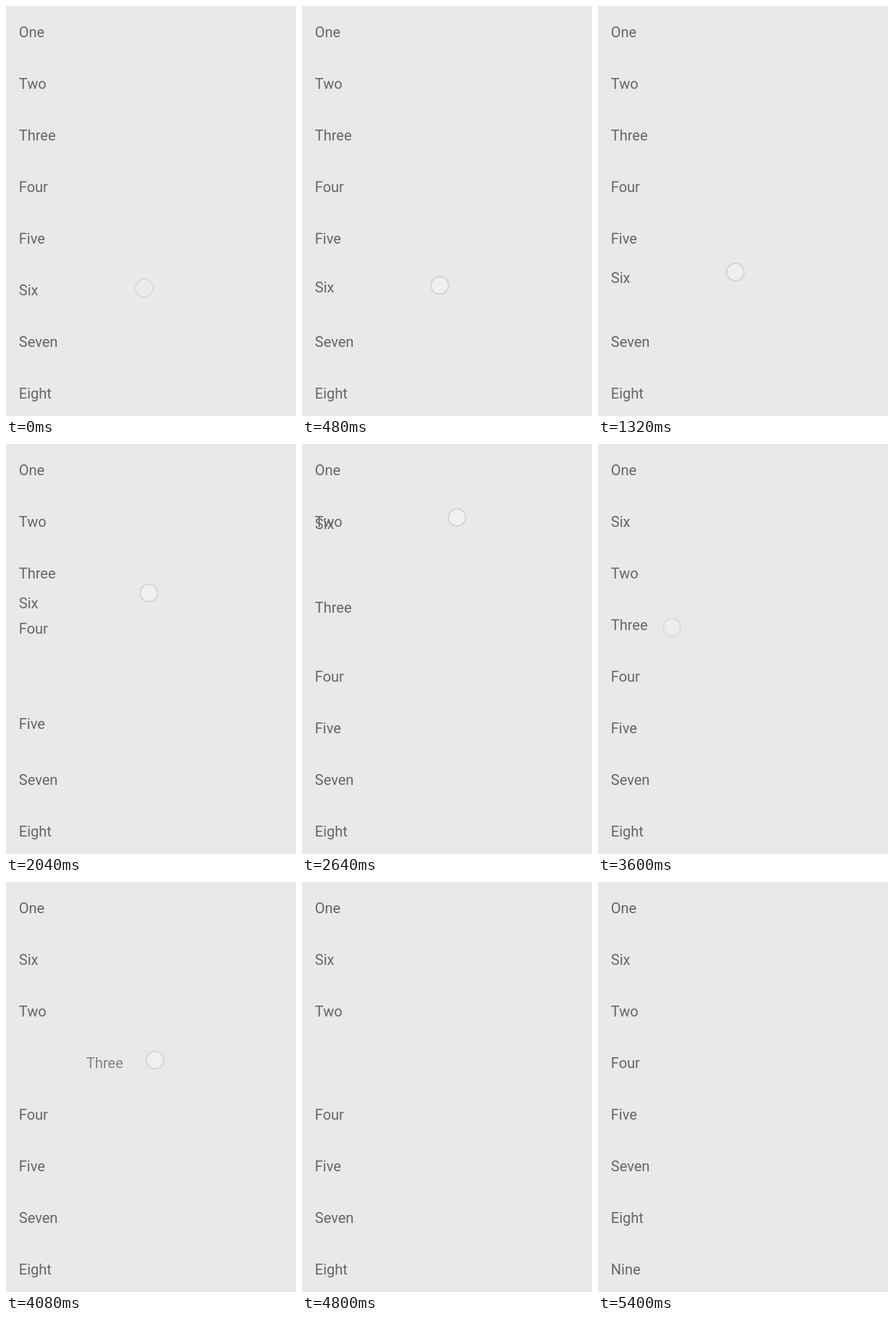
These frames come from a looping animation (400 px wide and 564 px high, 6120 ms). An HTML page:

```html
<!DOCTYPE html>
<html lang="en">
<head>
<meta charset="utf-8">
<title>Reorder and swipe list</title>
<style>
  html, body { margin: 0; width: 100%; height: 100%; overflow: hidden; background: #e9e9e9; }
  svg { display: block; width: 400px; height: 564px; }
  text { font: 20px Roboto, sans-serif; fill: #666; }
  circle { fill: #f0f0f0; stroke: #d5d5d5; stroke-width: 2; }
</style>
</head>
<body>
<svg id="stage" viewBox="0 0 400 564"></svg>
<script>
const LOOP = 6120, TICK = 120, LEFT = 17.8, TOP = 42.6, PITCH = 71.1;
const NAMES = ['One', 'Two', 'Three', 'Four', 'Five', 'Six', 'Seven', 'Eight', 'Nine'];
const DRAGGED = 5, SWIPED = 2, DROP = 3000, CLOSE = 4960;
const SLOW_TICKS = [0, 1, 4, 7, 11, 14, 16, 17, 19, 20, 22];

// Moment at which each row makes way for the dragged one
const yieldAt = { Two: 2750, Three: 2515, Four: 2030, Five: 1830 };

// time, x, y of the finger, and how far below it the row hangs
const drag = [
  [0, 190.5, 388, 2], [840, 189.5, 381.5, 3], [1320, 189.5, 366, 7.5], [1680, 189, 332, 10],
  [2040, 197, 205, 13], [2400, 212, 122, 9], [2880, 215.5, 80, 8], [DROP, 215.5, 78, 8]
];
// time, x, y of the finger
const swipe = [[3600, 102, 252], [3840, 126, 250], [4080, 205.5, 245], [4320, 310, 247]];
// time, shift of the row: dragged, then flung
const slide = [[3600, 0], [3840, 16], [4320, 170], [4800, 420]];

const clamp = v => Math.max(0, Math.min(1, v));
const easeOut = u => 1 - (1 - clamp(u)) ** 2;

// Linear interpolation along key points
function along(keys, t) {
  const i = Math.max(1, keys.findIndex(key => key[0] > t));
  const a = keys[i - 1], b = keys[i];
  const last = keys.at(-1);
  if (t >= last[0]) return last.slice(1);
  const u = clamp((t - a[0]) / (b[0] - a[0]));
  return a.map((v, k) => v + (b[k] - v) * u).slice(1);
}

// The picture steps: unevenly while dragging, every second tick while swiping
function hold(t) {
  let tick = Math.floor(t / TICK);
  if (tick < 24) tick = SLOW_TICKS.findLast(n => n <= tick);
  else if (tick >= 30 && tick < 42) tick -= tick % 2;
  return tick * TICK;
}

function rowOf(name, i, t) {
  if (i === DRAGGED) {
    const [, y, lag] = along(drag, t);
    const row = (y + lag - 35) / PITCH;
    return row + (1 - row) * easeOut((t - DROP) / 240);
  }
  const pushed = name in yieldAt ? easeOut((t - yieldAt[name]) / 300) : 0;
  const closed = i > SWIPED ? easeOut((t - CLOSE) / 200) : 0;
  return i + pushed - closed;
}

const stage = document.getElementById('stage');

function set(el, attrs) {
  for (const name in attrs) el.setAttribute(name, attrs[name]);
}

function add(tag, attrs, text = '') {
  const el = document.createElementNS('http://www.w3.org/2000/svg', tag);
  el.textContent = text;
  set(el, attrs);
  return stage.appendChild(el);
}

const labels = NAMES.map(name => add('text', { x: LEFT }, name));
const dot = add('circle', { r: 12 });

function draw(t) {
  NAMES.forEach((name, i) => set(labels[i], { y: TOP + PITCH * rowOf(name, i, t) }));

  const [dx] = along(slide, t);
  set(labels[SWIPED], { x: LEFT + dx, opacity: clamp(1 - dx / 400) });

  const [path, down, up] = t < 3600 ? [drag, 0, 3120] : [swipe, 3600, 4560];
  const [cx, cy] = along(path, t);
  const opacity = clamp(Math.min(0.65 + (t - down) / 300, (up - t) / 240));
  set(dot, { cx, cy, opacity });
}

const start = performance.now();
function frame() {
  draw(hold((performance.now() - start) % LOOP));
  requestAnimationFrame(frame);
}
frame();
</script>
</body>
</html>
```
